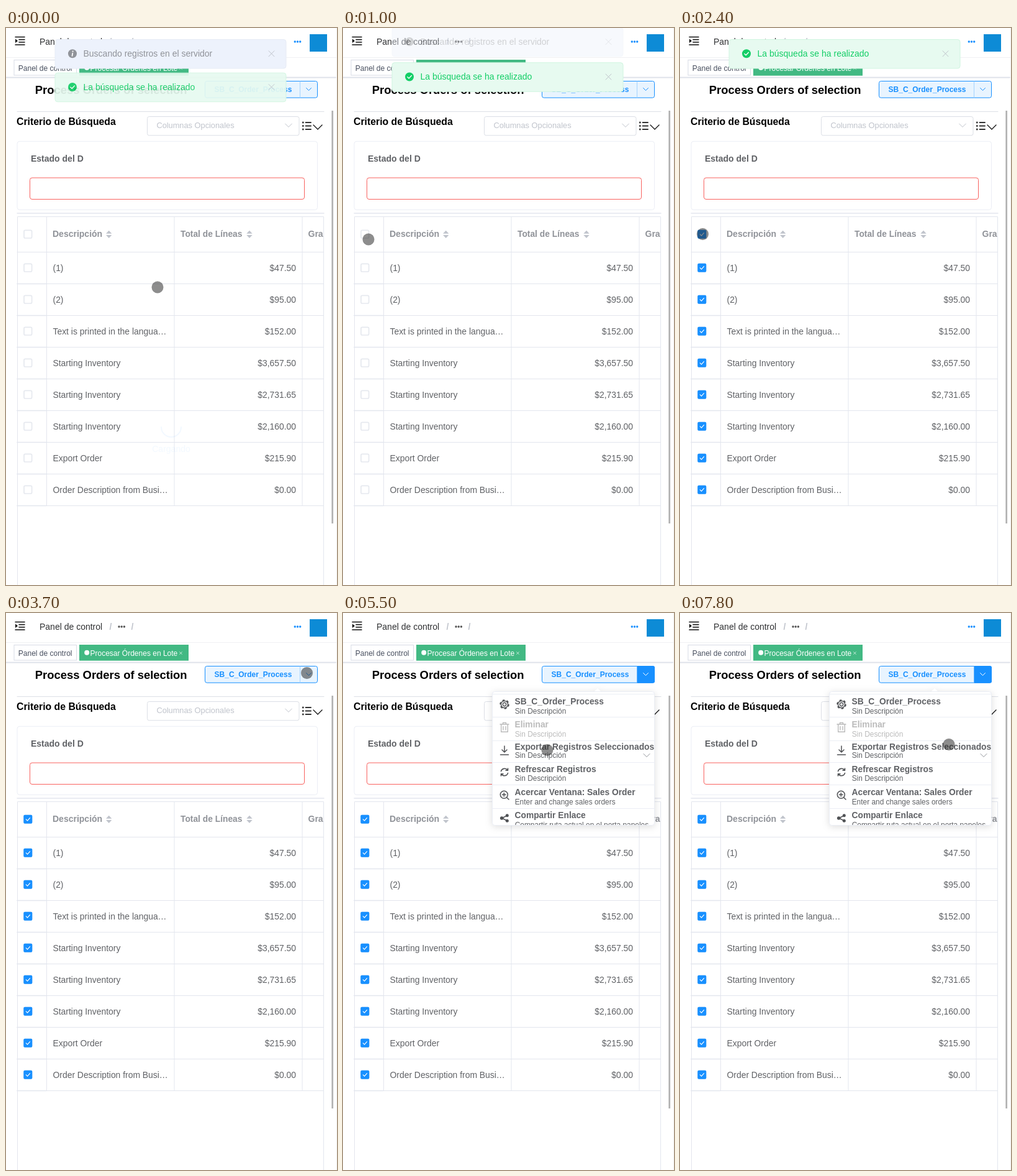
An HTML page for the animation above (8 s loop, 533 by 896 pixels).

```html
<!DOCTYPE html>
<html lang="es">
<head>
<meta charset="utf-8">
<title>Procesar Órdenes en Lote</title>
<style>
  html, body { margin: 0; width: 100%; height: 100%; overflow: hidden; background: #fff; }
  svg { display: block; width: 533px; height: 896px; font-family: "Liberation Sans", Arial, sans-serif; }
  .b { font-weight: bold; }
  .line { fill: none; stroke-linecap: round; stroke-linejoin: round; }
  #menu { filter: drop-shadow(0 2px 6px rgba(0, 0, 0, .13)); }
</style>
</head>
<body>
<svg id="stage" viewBox="0 0 533 896"></svg>
<script>
const LOOP = 8000, STEP = 100;
const BLUE = '#1890ff', GREEN = '#13ce66', GREY = '#606266', PALE = '#c0c4cc', RULE = '#e3e6ee';

const text = (x, y, s, size = 14, fill = GREY, extra = '') =>
  `<text x="${x}" y="${y}" font-size="${size}" fill="${fill}" ${extra}>${s}</text>`;
const bold = (x, y, s, size, fill, extra = '') => text(x, y, s, size, fill, `class="b" ${extra}`);
const rect = (x, y, w, h, fill = 'none', stroke = 'none', r = 0) =>
  `<rect x="${x}" y="${y}" width="${w}" height="${h}" rx="${r}" fill="${fill}" stroke="${stroke}"/>`;
const line = (d, stroke = RULE, width = 1) =>
  `<path class="line" d="${d}" stroke="${stroke}" stroke-width="${width}"/>`;
const dot = (x, y, r, fill) => `<circle cx="${x}" cy="${y}" r="${r}" fill="${fill}"/>`;
const group = (id, body) => `<g id="${id}">${body}</g>`;
const at = (x, y, body) => `<g transform="translate(${x} ${y})">${body}</g>`;
const chevron = (x, y, w, stroke, width = 1) =>
  line(`M${x - w} ${y - w / 2}l${w} ${w}l${w} ${-w}`, stroke, width);
const dots = (x, y, gap, fill) => [0, 1, 2].map(i => dot(x + i * gap, y, 1.7, fill)).join('');

function navbar() {
  return line('M15 14.5H30M21 18.7H30M21 22.8H30M15 27H30', '#111', 1.5) +
    '<path d="M15 17.6l4 3.2l-4 3.2z" fill="#111"/>' +
    text(54, 27, 'Panel de control', 14, '#303133') +
    bold(166.5, 27, '/', 14, PALE) + dots(182, 22, 4.2, '#555') + bold(201.5, 27, '/', 14, PALE) +
    dots(465.3, 22, 4.2, BLUE) + rect(489, 10, 28, 28, '#0d8bd6') +
    line('M0 47.5H533', '#f0f1f3') + line('M0 79.5H531', '#d8dce5', 1.6) + line('M0 81H531', '#f3f4f6') +
    rect(13, 51.5, 100.5, 24.5, '#fff', '#d8dce5') + text(19.8, 69, 'Panel de control', 12, '#495060') +
    rect(118, 51, 176, 25.7, '#42b983') + dot(130.2, 63.7, 4, '#fff') +
    text(135.5, 69, 'Procesar Órdenes en Lote', 12, '#fff') +
    line('M279.7 62.7l3.6 3.6m0-3.6l-3.6 3.6', '#e4f5ed', .9);
}

function criteria() {
  return bold(46.7, 106, 'Process Orders of selection', 18.45, '#000') +
    rect(320.5, 85.5, 181, 26.7, '#e8f4ff', BLUE, 3) + line('M473.5 86V112', '#a3d3ff') +
    bold(335.6, 103.3, 'SB_C_Order_Process', 12, BLUE) + chevron(487.5, 98.5, 4, BLUE) +
    group('split', '<path d="M473.5 85H499a3 3 0 0 1 3 3V109.700a3 3 0 0 1-3 3H473.500z" fill="#1890ff"/>' +
      chevron(487.5, 98.5, 4, '#fff')) +
    line('M18 134.5H512', '#dcdfe6') +
    bold(17, 156, 'Criterio de Búsqueda', 15.8, '#000') +
    rect(227.5, 142.5, 244.5, 30.3, '#fff', '#dcdfe6', 3) +
    text(242.4, 161, 'Columnas Opcionales', 12.8, PALE) + chevron(455, 156.7, 5.3, PALE) +
    [152, 157.5, 163].map(y => line(`M482.5 ${y}H491`, '#333', 1.8) + rect(477, y - 1.3, 2.6, 2.6, '#333')).join('') +
    chevron(502, 159.5, 7, '#111', 1.3) +
    rect(18, 182.3, 483.5, 110.2, '#fff', '#ebeef5', 4) +
    bold(40, 215, 'Estado del D', 14, GREY) +
    rect(38.5, 241, 442, 34.5, '#fff', '#f9625f', 3.5) +
    line('M18 298H512', RULE, 1.3) + rect(524.3, 133, 2.7, 664, '#b3b3b3') + line('M532.5 0V896', '#f2f2f2');
}

const ROWS = [
  ['(1)', '$47.50'], ['(2)', '$95.00'], ['Text is printed in the langua…', '$152.00'],
  ['Starting Inventory', '$3,657.50'], ['Starting Inventory', '$2,731.65'],
  ['Starting Inventory', '$2,160.00'], ['Export Order', '$215.90'],
  ['Order Description from Busi…', '$0.00']
];
const rowY = i => 386 + 51 * i;

function table() {
  const boxY = [331.7, ...ROWS.map((_, i) => rowY(i) - .3)];
  const sorter = x => `<path d="M${x} 330.700l4.700-5l4.700 5zM${x} 333l4.700 5l4.700-5z" fill="${PALE}"/>`;
  const tick = line('M-3 .2l2.200 2.300l4-4.600', '#fff', 1.2);
  return line('M18.5 896V303.5H511.5V896') + line('M18 360.500H511') +
    line('M65.5 304V768M271 304V768M477 304V768') +
    bold(75, 336, 'Descripción', 14, '#909399') + sorter(161) +
    bold(281, 336, 'Total de Líneas', 13.8, '#909399') + sorter(387.3) +
    '<svg width="511" height="896">' + bold(486.5, 336, 'Grand Total', 14, '#909399') + '</svg>' +
    ROWS.map(([name, total], i) => {
      const y = rowY(i);
      return line(`M18 ${y + 25.5}H511`) + line(`M18 ${y + 25.5}H65`, RULE, 1.6) +
        text(75.5, y + 4.5, name, 13.9) + text(467, y + 4.5, total, 13.9, GREY, 'text-anchor="end"');
    }).join('') +
    boxY.map(y => `<rect x="29" y="${y - 6.3}" width="12.600" height="12.600" rx="2" fill="#fff" stroke="#e6e9ef" stroke-width="1.700"/>`).join('') +
    group('checks', boxY.map(y => at(35.3, y, rect(-7, -7, 14, 14, BLUE, 'none', 2))).join('')) +
    group('ticks', boxY.map(y => at(35.3, y, tick)).join(''));
}

const arc = 'M-5.500-1.500A5.800 5.800 0 0 1 5-3M5.500-6V-2.800H2';
const ICONS = {
  gear: c => `<circle r="6.800" fill="none" stroke="${c}" stroke-width="2" stroke-dasharray="3.600 3.520"/>` +
    `<circle r="5.600" fill="none" stroke="${c}" stroke-width="1.500"/><circle r="2.700" fill="none" stroke="${c}" stroke-width="1.400"/>`,
  trash: c => line('M-7-5H7M-2.500-5V-7.500H2.500V-5M-5.300-5V7.300H5.300V-5M-2-1.500V4M2-1.500V4', c, 1.4),
  load: c => line('M0-7V3M-4-1L0 3L4-1M-6.500 7H6.500', c, 1.5),
  refresh: c => line(arc, c, 1.6) + `<g transform="rotate(180)">${line(arc, c, 1.6)}</g>`,
  zoom: c => `<circle cx="-.7" cy="-.7" r="6" fill="none" stroke="${c}" stroke-width="1.500"/>` +
    line('M3.700 3.700L7 7M-3.500-.7H2.100M-.7-3.500V2.100', c, 1.5),
  share: c => line('M4-4L-4 0L4 4', c, 1.5) + dot(4.3, -4.2, 2.5, c) + dot(-4.3, 0, 2.8, c) + dot(4.3, 4.2, 2.5, c)
};

// icon, title, detail, title baseline, detail baseline, icon centre
const ITEMS = [
  ['gear', 'SB_C_Order_Process', 'Sin Descripción', 147, 162, 147],
  ['trash', 'Eliminar', 'Sin Descripción', 184, 199, 184],
  ['load', 'Exportar Registros Seleccionados', 'Sin Descripción', 220, 233.3, 221],
  ['refresh', 'Refrescar Registros', 'Sin Descripción', 256, 270.3, 256],
  ['zoom', 'Acercar Ventana: Sales Order', 'Enter and change sales orders', 293, 308, 293],
  ['share', 'Compartir Enlace', 'Compartir ruta actual en el porta papeles', 330, 345, 330]
];

function menu() {
  return '<path d="M404 127l6-6l6 6z" fill="#fff"/>' + rect(240.5, 126.5, 261, 215, '#fff', '#ebeef5', 4) +
    [130.5, 167.5, 205.5, 240.5, 276.5, 314.5].map(y => line(`M241 ${y}H501`, '#ebeef5')).join('') +
    '<svg width="501" height="341">' +
    ITEMS.map(([icon, title, detail, y1, y2, yi]) => {
      const c = icon === 'trash' ? '#bbb' : GREY;
      return at(260, yi, ICONS[icon](icon === 'trash' ? c : '#505255')) +
        bold(276.5, y1, title, 13.8, c) + text(276.7, y2, detail, 11.9, c);
    }).join('') + '</svg>' + chevron(489, 229, 5, '#909399');
}

function toast(id, message, color, fill, border, mark) {
  return group(id, rect(79, .5, 372, 46.500, fill, border, 4) + dot(107, 23.3, 7, color) + mark +
    text(124.5, 28, message, 14, color) + line('M423 18.8l9 9m0-9l-9 9', PALE));
}

const $ = id => document.getElementById(id);
$('stage').innerHTML = rect(0, 0, 533, 896, '#fff') + navbar() + criteria() + table() +
  group('loading', line('M250 642a16 16 0 0 0 32 0', BLUE, 2) +
    text(266, 682, 'Cargando', 14, BLUE, 'text-anchor="middle"')) +
  group('menu', menu()) +
  toast('info', 'Buscando registros en el servidor', '#909399', '#edf2fc', '#e6ebf5',
    line('M107.300 22.500L106.500 27', '#fff', 1.7) + dot(107.6, 19.6, 1.1, '#fff')) +
  toast('done', 'La búsqueda se ha realizado', GREEN, '#e7faf0', '#d0f5e0',
    line('M103.800 23.500l2.300 2.300l4.300-4.600', '#fff', 1.3)) +
  '<circle id="cursor" r="9.400" fill="#282828" fill-opacity=".53" stroke="#000" stroke-opacity=".08"/>';

const clamp = v => Math.min(1, Math.max(0, v));

function bezier(x1, y1, x2, y2) {
  const curve = (a, b, u) => 3 * a * u * (1 - u) ** 2 + 3 * b * u * u * (1 - u) + u ** 3;
  return x => {
    let lo = 0, hi = 1;
    for (let i = 0; i < 24; i++) {
      const mid = (lo + hi) / 2;
      if (curve(x1, x2, mid) < x) lo = mid; else hi = mid;
    }
    return curve(y1, y2, hi);
  };
}
const ease = bezier(.25, .1, .25, 1), zoom = bezier(.23, 1, .32, 1);
const progress = (t, start, span, fn = ease) => {
  const p = clamp((t - start) / span);
  return p === 0 || p === 1 ? p : fn(p);
};

// time, x, y
const PATH = [
  [0, 244, 417], [400, 244, 417], [1000, 41, 340], [1300, 39, 333], [1600, 36.5, 331.5],
  [2800, 36.5, 331.5], [2900, 308, 218], [3000, 308, 218], [3200, 504, 86], [3400, 504, 86],
  [3700, 484.5, 96.5], [4400, 484.5, 96.5], [4600, 471.5, 108.5], [4900, 300, 211],
  [5100, 278, 218], [5800, 367, 222], [6400, 458.5, 223], [6700, 486, 221], [6900, 490, 226],
  [7300, 490, 226], [7500, 463, 223], [7600, 463, 223], [7800, 433, 211.5], [LOOP, 433, 211.5]
];
function cursorAt(t) {
  const i = PATH.findIndex(p => p[0] > t);
  const [t0, x0, y0] = PATH[i - 1], [t1, x1, y1] = PATH[i];
  const k = (t - t0) / (t1 - t0);
  return [x0 + (x1 - x0) * k, y0 + (y1 - y0) * k];
}

function place(id, opacity, transform) {
  const el = $(id);
  el.setAttribute('opacity', opacity);
  el.style.display = opacity > 0 ? '' : 'none';
  if (transform) el.setAttribute('transform', transform);
}

function draw(now) {
  const t = Math.floor(now % LOOP / STEP) * STEP;
  place('loading', t < 100 ? .05 : 0);
  place('info', 1 - progress(t, 900, 300), `translate(0 ${18 - 47 * progress(t, 900, 400)})`);
  const doneY = 34 + 47 * progress(t, -200, 400) - 63 * progress(t, 900, 400);
  place('done', t < 2900 ? progress(t, -200, 300) : 0, `translate(0 ${doneY})`);
  place('checks', clamp((t - 2000) / 300));
  place('ticks', clamp((t - 2100) / 300));
  place('split', t >= 4100 ? 1 : 0);
  const open = progress(t, 4000, 300, zoom);
  place('menu', open, `translate(0 ${126 * (1 - open)}) scale(1 ${open})`);
  place('cursor', 1, `translate(${cursorAt(t)})`);
}

const start = performance.now();
(function tick() {
  draw(performance.now() - start);
  requestAnimationFrame(tick);
})();
</script>
</body>
</html>
```
